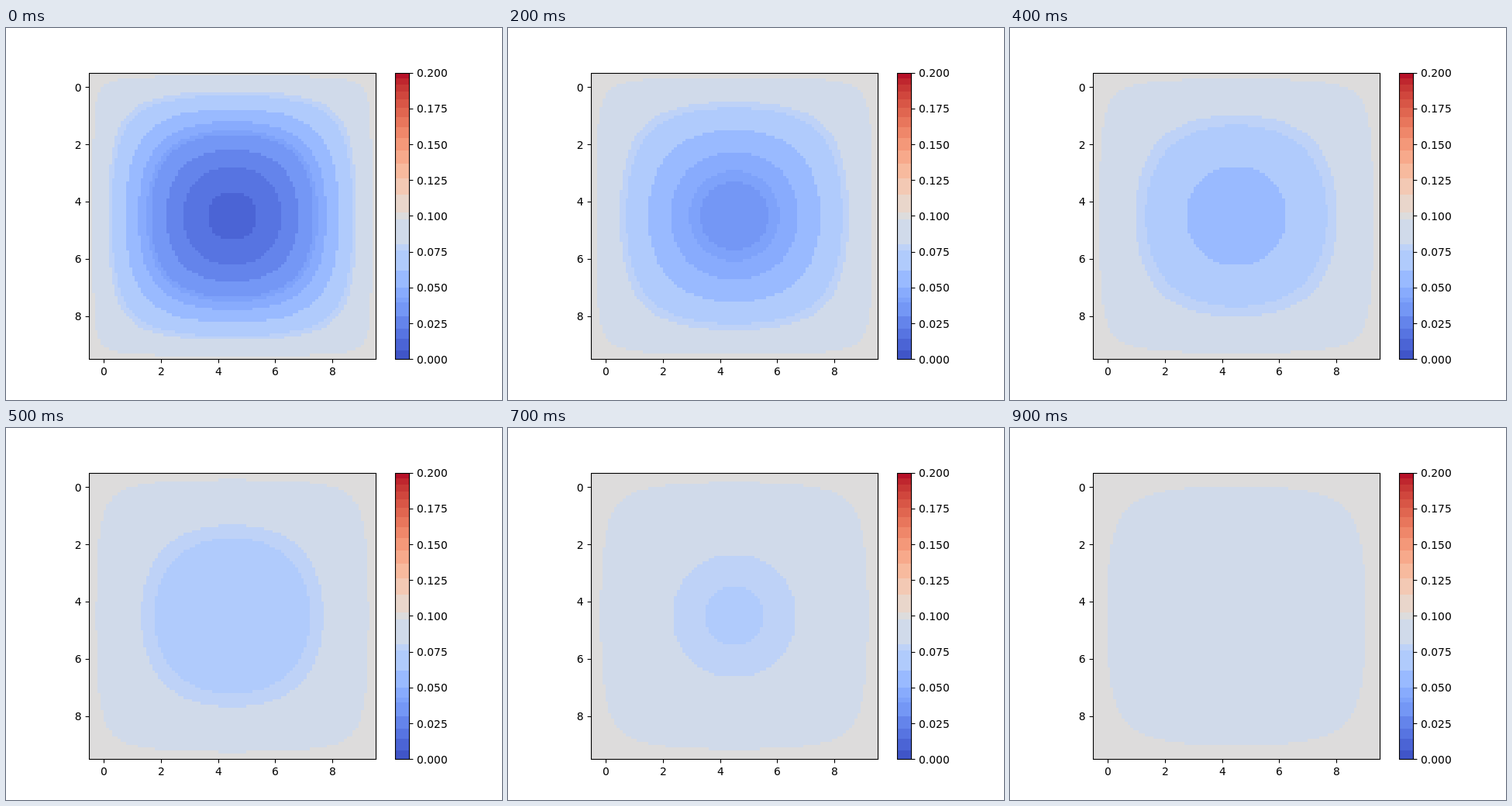
These frames come from a looping animation (640x480 px, 9 s). An HTML page with a canvas:

```html
<!DOCTYPE html>
<html lang="en">
<head>
<meta charset="utf-8">
<title>Heat diffusion on a plate</title>
<style>
html, body { margin: 0; width: 100%; height: 100%; overflow: hidden; background: #fff; }
canvas { display: block; width: 640px; height: 480px; }
</style>
</head>
<body>
<canvas id="stage" width="640" height="480"></canvas>
<script>
const ctx = document.getElementById("stage").getContext("2d");

const LOOP = 9000, STEP = 100, LAST = 9;
const N = 100;
const EDGE = 0.1, VMAX = 0.2;
const X0 = 107.2, Y0 = 57.6, SIZE = 369.6;
const BAR_X = 502, BAR_W = 18;
const BOTTOM = Y0 + SIZE;

// Band limits in 256ths of the value range; the warm bands shrink steadily
const limits = [0, 8, 18, 27, 38, 51, 55, 64, 79, 97, 102.5, 125, 131];
const WARM = 13, SHRINK = 0.91;
for (let i = 1; i <= WARM; i++) {
  limits.push(131 + 125 * (1 - SHRINK ** i) / (1 - SHRINK ** WARM));
}

// Cool-to-warm ramp: polar Lab, fading to light grey in the middle
function ramp(f) {
  const cool = f < 0.5;
  const t = 2 * Math.min(f, 1 - f);
  const m = 80 + 8 * t, s = 1.08 * (1 - t);
  const h = cool ? -1.1 - 0.561 * t : 0.5 + 0.561 * t;
  return labToRgb(m * Math.cos(s), m * Math.sin(s) * Math.cos(h), m * Math.sin(s) * Math.sin(h));
}

function labToRgb(l, a, b) {
  const inv = v => v > 6 / 29 ? v ** 3 : (v - 4 / 29) * 108 / 841;
  const fy = (l + 16) / 116;
  const x = 0.9505 * inv(fy + a / 500), y = inv(fy), z = 1.089 * inv(fy - b / 200);
  const gamma = v => {
    v = Math.min(1, Math.max(0, v));
    return Math.round(255 * (v > 0.0031308 ? 1.055 * v ** (1 / 2.4) - 0.055 : 12.92 * v));
  };
  const r = gamma(3.2406 * x - 1.5372 * y - 0.4986 * z);
  const g = gamma(-0.9689 * x + 1.8758 * y + 0.0415 * z);
  const bl = gamma(0.0557 * x - 0.204 * y + 1.057 * z);
  return `rgb(${r},${g},${bl})`;
}

const colors = limits.slice(1).map((hi, i) => ramp((0.4 * limits[i] + 0.6 * hi) / 256));

function colorOf(value) {
  const k = value / VMAX * 256;
  return colors[limits.findIndex(limit => limit > k) - 1];
}

// Fourier series of a slab that starts at 1 and is held at 0 on both ends
function profile(q) {
  return Array.from({ length: N }, (_, i) => {
    const a = (2 * i / (N - 1) - 1) * Math.PI / 2;
    let sum = 0;
    for (let m = 0; m < 6; m++) {
      const n = 2 * m + 1;
      sum += (m % 2 ? -1 : 1) / n * Math.cos(n * a) * Math.exp(-n * n * q);
    }
    return 4 / Math.PI * sum;
  });
}

const cut = (start, i) => Math.round(start + i * SIZE / N);

function drawField(step) {
  const g = profile(0.264 + 0.0941 * step);
  for (let r = 0; r < N; r++) {
    const y = cut(Y0, r), h = cut(Y0, r + 1) - y;
    for (let c = 0; c < N; c++) {
      const x = cut(X0, c);
      ctx.fillStyle = colorOf(EDGE * (1 - g[r] * g[c]));
      ctx.fillRect(x, y, cut(X0, c + 1) - x, h);
    }
  }
}

function drawBar() {
  const yAt = k => Math.round(BOTTOM - k / 256 * SIZE);
  colors.forEach((color, i) => {
    const top = yAt(limits[i + 1]);
    ctx.fillStyle = color;
    ctx.fillRect(BAR_X, top, BAR_W, yAt(limits[i]) - top);
  });
}

function line(x1, y1, x2, y2) {
  ctx.beginPath();
  ctx.moveTo(x1, y1);
  ctx.lineTo(x2, y2);
  ctx.stroke();
}

function label(text, x, y, align) {
  ctx.textAlign = align;
  ctx.fillText(text, x, y);
}

function drawAxes() {
  ctx.strokeStyle = ctx.fillStyle = "#000";
  ctx.lineWidth = 1.11;
  ctx.font = '13.889px "DejaVu Sans", sans-serif';
  ctx.textBaseline = "alphabetic";
  ctx.strokeRect(107.5, 58.5, 370, 369);
  ctx.strokeRect(BAR_X + 0.5, 58.5, BAR_W, 369);

  const baseline = y => Math.floor(y) + 6;
  for (let v = 0; v < 10; v += 2) {
    const x = X0 + (v + 0.5) / 10 * SIZE;
    const y = Y0 + (v + 0.5) / 10 * SIZE;
    const tx = Math.round(x) + 0.5, ty = Math.round(y) + 0.5;
    line(tx, 427.5, tx, 432.4);
    line(107.5, ty, 102.6, ty);
    label(String(v), Math.round(x - 4), 448, "left");
    label(String(v), 97.5, baseline(y), "right");
  }
  for (let i = 0; i <= 8; i++) {
    const y = BOTTOM - i / 8 * SIZE;
    const ty = Math.round(y) + 0.5;
    line(520.5, ty, 525.4, ty);
    label((i * 0.025).toFixed(3), 530, baseline(y), "left");
  }
}

function draw(step) {
  ctx.fillStyle = "#fff";
  ctx.fillRect(0, 0, 640, 480);
  drawField(step);
  drawBar();
  drawAxes();
}

const start = performance.now();
let shown = -1;

function tick() {
  const t = (performance.now() - start) % LOOP;
  const step = Math.min(LAST, Math.floor(t / STEP));
  if (step !== shown) {
    draw(step);
    shown = step;
  }
  requestAnimationFrame(tick);
}
tick();
</script>
</body>
</html>
```
